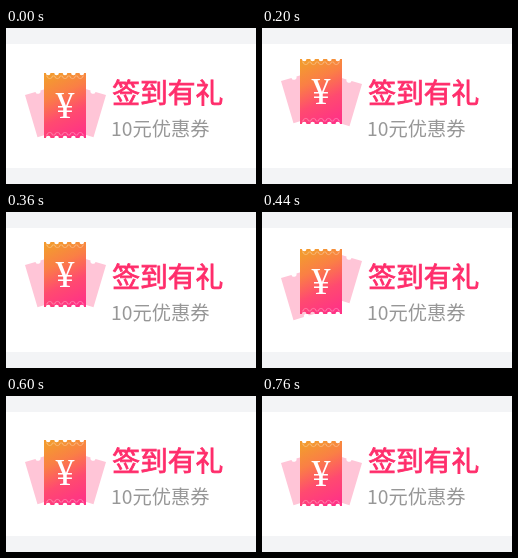
These frames come from a looping animation (250 px wide and 156 px high, 1800 ms). An HTML page:

```html
<!DOCTYPE html>
<html lang="zh-CN">
<head>
<meta charset="utf-8">
<style>
html, body { margin: 0; width: 100%; height: 100%; overflow: hidden; background: #fff; }
svg { display: block; width: 250px; height: 156px; }
.title, .note { font-family: "Noto Sans CJK SC", "Noto Sans CJK", sans-serif; }
.title { font-size: 27.8px; fill: #ff2d6b; stroke: #ff2d6b; stroke-width: 0.8px; }
.note { font-size: 19.3px; font-weight: 300; fill: #979797; }
.yen { font: 38px "Liberation Serif", serif; fill: #fff; text-anchor: middle; }
</style>
</head>
<body>
<svg viewBox="0 0 250 156">
  <defs>
    <linearGradient id="warm" x1="0.35" y1="0" x2="0.65" y2="1">
      <stop offset="0" stop-color="#f39a30"/>
      <stop offset="0.3" stop-color="#fa7f45"/>
      <stop offset="0.65" stop-color="#ff4a70"/>
      <stop offset="1" stop-color="#ff3385"/>
    </linearGradient>
  </defs>
  <path fill="#f3f4f6" d="M0 0H250V16H0ZM0 140H250V156H0Z"/>
  <path id="left" class="wing" fill="#ffc5d7"/>
  <path id="right" class="wing" fill="#ffc5d7"/>
  <g id="main">
    <path id="ticket" fill="url(#warm)"/>
    <path id="trim" fill="none" stroke="#fff" stroke-opacity="0.4" stroke-width="0.7"/>
    <text class="yen" x="21" y="45">¥</text>
  </g>
  <text class="title" x="106.2" y="75">签到有礼</text>
  <text class="note" x="105" y="108">10元优惠券</text>
</svg>
<script>
const LOOP = 1800, STEP = 40;
const $ = id => document.getElementById(id);

// A row of round bites; dir 1 runs right, -1 runs left.
function edge(w, bites, r, dir = 1) {
  const flat = w / bites - 2 * r;
  const side = `h${dir * flat / 2}`;
  return (side + `a${r} ${r} 0 0 0 ${dir * 2 * r} 0` + side).repeat(bites);
}
const coupon = (w, h, bites, r) =>
  `M0 0${edge(w, bites, r)}V${h}${edge(w, bites, r, -1)}Z`;

$("ticket").setAttribute("d", coupon(42, 65, 5, 2.3));
$("trim").setAttribute("d", `M2 3${edge(38, 5, 2.6)}M40 62${edge(38, 5, 2.6, -1)}`);
document.querySelectorAll(".wing").forEach(p => p.setAttribute("d", coupon(27, 44, 1, 2.6)));

// time, then the lift of main, left and right
const keys = [
  [0, 0, 0, 0],
  [120, -5, -17, -4],
  [200, -14, -14, -11],
  [280, -15, -14, -14],
  [360, -15, -14, -14],
  [440, -8, -1, -18],
  [600, -1, -1, -1],
  [760, 0, 0, 0],
  [LOOP, 0, 0, 0]
];

function pose(t) {
  const i = keys.findIndex(k => k[0] > t), a = keys[i - 1], b = keys[i];
  const p = (t - a[0]) / (b[0] - a[0]);
  return a.slice(1).map((v, n) => v + (b[n + 1] - v) * p);
}

const start = performance.now();
function draw(now) {
  const time = Math.max(0, now - start) % LOOP;
  const [main, left, right] = pose(Math.floor(time / STEP) * STEP);
  $("main").setAttribute("transform", `translate(38 ${45 + main})`);
  $("left").setAttribute("transform", `translate(19 ${67 + left}) rotate(-16.5)`);
  $("right").setAttribute("transform", `translate(100 ${67 + right}) scale(-1 1) rotate(-16.5)`);
  requestAnimationFrame(draw);
}
draw(start);
</script>
</body>
</html>
```
